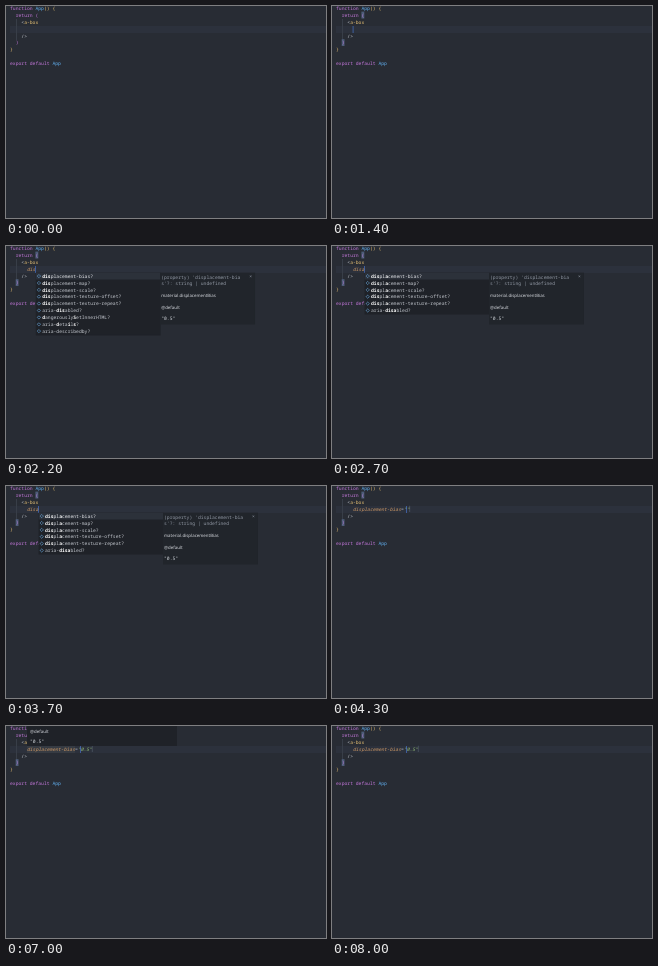
Write an HTML page that moves like this. It is 320 by 212 pixels and loops after 8.1 s.

```html
<!DOCTYPE html>
<html lang="en">
<head>
<meta charset="utf-8">
<title>Attribute completion</title>
<style>
  html, body { margin: 0; width: 100%; height: 100%; overflow: hidden; background: #282c34; }
  /* Laid out at ten times the size so that small text keeps its exact spacing. */
  #stage {
    position: absolute; width: 3200px; height: 2120px; overflow: hidden;
    transform: scale(.1); transform-origin: 0 0;
    background: #282c34; color: #c8ccd4;
    font: 500 47.1px/68.8px "Noto Sans Mono", "DejaVu Sans Mono", monospace;
    text-rendering: geometricPrecision; white-space: pre;
  }
  #stage div { position: absolute; }
  .key { color: #c678dd; }
  .name { color: #61afef; }
  .tag, .gold { color: #e9c274; }
  .orchid { color: #c678dd; }
  .attr { color: #d19a66; font-style: italic; }
  .equals { color: #abb2bf; font-style: normal; }
  .str { color: #98c379; border-right: 6px solid #5b6472; }
  .band { background: #2c313c; }
  .guide { background: #383e48; }
  .match { background: #4d5d78; }
  .hover { background: #363b43; }
  .caret { background: #528bff; }
  .panel { background: #1f2228; overflow: hidden; }
  .detail { background: #21252b; color: #9299a5; }
  .row { width: 100%; height: 68.8px; padding-left: 65px; box-sizing: border-box; color: #c6cad1; }
  .row:first-child { background: #2c313a; color: #e6e8ec; }
  .row b { color: #fff; }
  .row::before {
    content: ""; position: absolute; left: 17px; top: 20px; width: 18px; height: 18px;
    border: 6px solid #6aa9dc; border-radius: 8px; transform: rotate(45deg);
  }
  .prose { font: 500 44px/68.8px "Noto Sans", "Open Sans", sans-serif; color: #d7dae0; }
  .lit { color: #d5d9df; }
</style>
</head>
<body>
<div id="stage"></div>
<script>
const LOOP = 8100, CHAR = 2.826, LINE = 6.88, LEFT = 4, TOP = -1.25;
const stage = document.getElementById('stage');
const col = n => LEFT + n * CHAR;
const row = n => TOP + n * LINE;

function add(cls, x, y, w, h, html = '', parent = stage) {
  const el = document.createElement('div');
  el.className = cls;
  el.innerHTML = html;
  Object.assign(el.style, { left: x * 10 + 'px', top: y * 10 + 'px' });
  if (w) el.style.width = w * 10 + 'px';
  if (h) el.style.height = h * 10 + 'px';
  parent.append(el);
  return el;
}

const text = (cls, x, y, html, parent) => add(cls, x, y, 0, 0, html, parent);

function during(el, from, to) {
  el.animate([
    { opacity: 0, offset: 0 },
    { opacity: 1, offset: from / LOOP },
    { opacity: 0, offset: to / LOOP },
    { opacity: 0, offset: 1 }
  ].map(k => ({ ...k, easing: 'step-end' })), { duration: LOOP, iterations: Infinity });
}

const tint = (cls, s) => `<span class="${cls}">${s}</span>`;

// Editor background, guides and matched brackets
add('band', LEFT, 20, 316, 7);
add('guide', 10, 13, 1, 21);
during(add('match', col(9), row(1), CHAR, LINE), 1300, LOOP);
during(add('match', col(2), row(5), CHAR, LINE), 1300, LOOP);
during(add('hover', col(6), 20, CHAR * 17, 7), 5400, 7600);

// Code
[
  [0, 0, tint('key', 'function') + ' ' + tint('name', 'App') + tint('gold', '() {')],
  [1, 2, tint('key', 'return') + ' ' + tint('orchid', '(')],
  [2, 4, '&lt;' + tint('tag', 'a-box')],
  [4, 4, '/&gt;'],
  [5, 2, tint('orchid', ')')],
  [6, 0, tint('gold', '}')],
  [8, 0, tint('key', 'export default') + ' ' + tint('name', 'App')]
].forEach(([line, c, html]) => text('', col(c), row(line), html));

// Typed attribute: time, name, value
const typing = [
  [1800, 'd'], [2000, 'di'], [2100, 'dis'], [2700, 'disa'],
  [3900, 'displacement-bias', ''],
  [4400, 'displacement-bias', '0'],
  [4500, 'displacement-bias', '0.'],
  [4700, 'displacement-bias', '0.5']
];
typing.forEach(([from, name, value], i) => {
  const to = i + 1 < typing.length ? typing[i + 1][0] : LOOP;
  const tail = value === undefined ? '' : tint('equals', '=') + tint('str', `"${value}"`);
  during(text('attr', col(6), row(3), name + tail), from, to);
});

// Caret: column, from, to
[
  [6, 1300, 1800], [7, 1800, 2000], [8, 2000, 2100], [9, 2100, 2600],
  [10, 2700, 3200], [10, 3700, 3900], [25, 3900, 4400], [26, 4400, 4500],
  [27, 4500, 4700], [28, 4700, 4900],
  [25, 4900, 5400], [25, 5900, 6400], [25, 6900, 7400], [25, 7900, LOOP]
].forEach(([c, from, to]) => during(add('caret', col(c) - 0.2, 20, 0.5, 7), from, to));

// Suggestion list; matched letters stand between asterisks
function suggest(x, from, to, items, detailHeight, fill) {
  const list = add('panel', x, 26.6, 124.5, items.length * LINE + 0.4);
  items.forEach((item, i) =>
    add('row', 0, i * LINE, 0, 0, item.replace(/\*(.+?)\*/g, '<b>$1</b>') + '?', list));
  const detail = add('panel detail', x + 124.5, 26.6, 94.5, detailHeight);
  fill(detail);
  text('', 89, -0.1, '×', detail);
  during(list, from, to);
  during(detail, from, to);
}

const displacement = mark =>
  ['bias', 'map', 'scale', 'texture-offset', 'texture-repeat'].map(s => `${mark}-${s}`);

function reactDetail(p) {
  ['(property) React.DOMAttribute…', '    __html: string;', '} | undefined']
    .forEach((s, i) => text('', 1, 0.7 + i * LINE, s, p));
}

function biasDetail(p) {
  text('', 1, 0.7, "(property) 'displacement-bia", p);
  text('', 1, 0.7 + LINE, "s'?: string | undefined", p);
  text('prose', 1, 19.7, 'material.displacementBias', p);
  text('prose', 1, 31, '@default', p);
  text('lit', 1, 42, '"0.5"', p);
}

suggest(24, 1900, 2100, [
  '*d*angerouslySetInnerHTML', '*d*atatype', '*d*aydream-controls', '*d*efaultChecked',
  '*d*efaultValue', '*d*epth', '*d*ir', ...displacement('*d*isplacement')
], 25.5, reactDetail);

suggest(29.7, 2100, 2700, [
  ...displacement('*dis*placement'), 'aria-*dis*abled', '*d*angerously*S*etInnerHTML',
  'aria-*d*eta*i*l*s*', 'aria-describedby'
], 52, biasDetail);

suggest(32.5, 2700, 3900, [
  ...displacement('*dis*pl*a*cement'), 'aria-*disa*bled'
], 52, biasDetail);

// Hover card
const card = add('panel', 21, 0, 150, 20);
text('prose', 3, 2, '@default', card);
text('lit', 3, 11.4, '"0.5"', card);
during(card, 5600, 7600);
</script>
</body>
</html>
```
